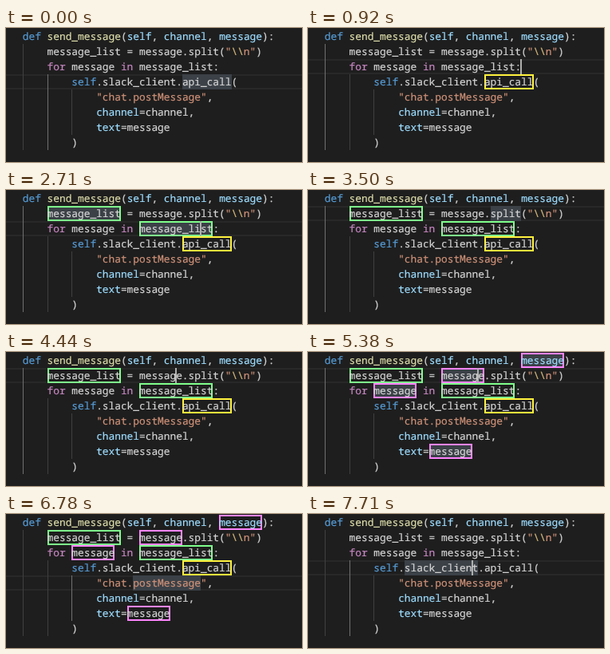
An HTML page with a canvas that plays this animation: 371x168 px, repeating every 8.11 s.

```html
<!DOCTYPE html>
<html lang="en">
<head>
<meta charset="utf-8">
<title>Highlighting words in an editor</title>
<style>
  html, body { margin: 0; width: 100%; height: 100%; overflow: hidden; background: #1e1e1e; }
  canvas, pre { position: absolute; margin: 0; left: 0; top: 0; }
  pre {
    left: 20.75px; top: 1px; color: #d4d4d4;
    font: 500 12.833px/19px "Noto Sans Mono", "Liberation Mono", monospace;
    font-variant-ligatures: none; text-rendering: geometricPrecision;
    -webkit-text-stroke: .2px;
  }
  .k { color: #569cd6 } .f { color: #dcdcaa } .v { color: #9cdcfe }
  .c { color: #c586c0 } .s { color: #ce9178 } .e { color: #d7ba7d }
</style>
</head>
<body>
<canvas id="view" width="371" height="168"></canvas>
<pre id="code"><span class="k">def</span> <span class="f">send_message</span>(<span class="v">self</span>, <span class="v">channel</span>, <span class="v">message</span>):
    message_list = message.split(<span class="s">"<span class="e">\\</span>n"</span>)
    <span class="c">for</span> message <span class="c">in</span> message_list:
        <span class="k">self</span>.slack_client.api_call(
            <span class="s">"chat.postMessage"</span>,
            <span class="v">channel</span>=channel,
            <span class="v">text</span>=message
        )</pre>
<script>
const LOOP = 8110, BLINK = 470, SELECT_DELAY = 250, CLEAR = 6930;
const LINE = 19, TAB = 4;
const ctx = document.getElementById('view').getContext('2d');
const lines = document.getElementById('code').textContent.split('\n');

// Each click places the caret; a marked word also gets a lasting box.
const clicks = [
  { at: -BLINK, row: 3, col: 34, color: '#fff23d', mark: 460 },
  { at: 840, row: 2, col: 32 },
  { at: 1710, row: 2, col: 29, color: '#7fff8c', mark: 2560 },
  { at: 2960, row: 1, col: 30 },
  { at: 4440, row: 1, col: 25, color: '#ff85ff', mark: 5210 },
  { at: 6230, row: 4, col: 25 },
  { at: 7450, row: 3, col: 24 }
];

const colX = col => Math.round(20.75 + col * 7.7);
const rowY = row => 1 + row * LINE;
const indent = line => line.search(/\S/);

function wordAt({ row, col }) {
  const hit = [...lines[row].matchAll(/\w+/g)]
    .find(m => m.index <= col && col <= m.index + m[0].length);
  return hit && hit[0];
}

// Pixel boxes of every whole-word occurrence
function places(word) {
  return lines.flatMap((line, row) =>
    [...line.matchAll(new RegExp(`\\b${word}\\b`, 'g'))].map(m => {
      const x = colX(m.index);
      return [x, rowY(row), colX(m.index + word.length) - x, LINE];
    }));
}

for (const click of clicks) {
  const word = wordAt(click);
  click.places = word ? places(word) : [];
}

function fill(color, x, y, w, h) {
  ctx.fillStyle = color;
  ctx.fillRect(x, y, w, h);
}

function drawGuides(caretRow) {
  const active = Math.max(0, indent(lines[caretRow]) - TAB);
  lines.forEach((line, row) => {
    for (let col = 0; col < indent(line); col += TAB)
      fill(col === active ? '#707070' : '#404040', colX(col), rowY(row), 1, LINE);
  });
}

function render(t) {
  const now = clicks.findLast(click => click.at <= t);
  const age = t - now.at;

  fill('#1e1e1e', 0, 0, 371, 168);
  fill('#282828', 0, rowY(now.row), 371, 2);
  fill('#282828', 0, rowY(now.row + 1) - 2, 371, 2);

  if (age >= SELECT_DELAY) now.places.forEach(box => fill('#3b4147', ...box));
  drawGuides(now.row);

  ctx.lineWidth = 2;
  for (const { mark, color, places } of clicks) {
    if (!(t >= mark && t < CLEAR)) continue;
    ctx.strokeStyle = color;
    for (const [x, y, w, h] of places) ctx.strokeRect(x + 1, y + 1, w - 2, h - 2);
  }

  const caretOn = Math.floor(age / BLINK) % 2 === 0;
  if (caretOn) fill('#aeafad', colX(now.col) - 1, rowY(now.row), 2, LINE);
}

function tick() {
  render(performance.now() % LOOP);
  requestAnimationFrame(tick);
}
tick();
</script>
</body>
</html>
```
